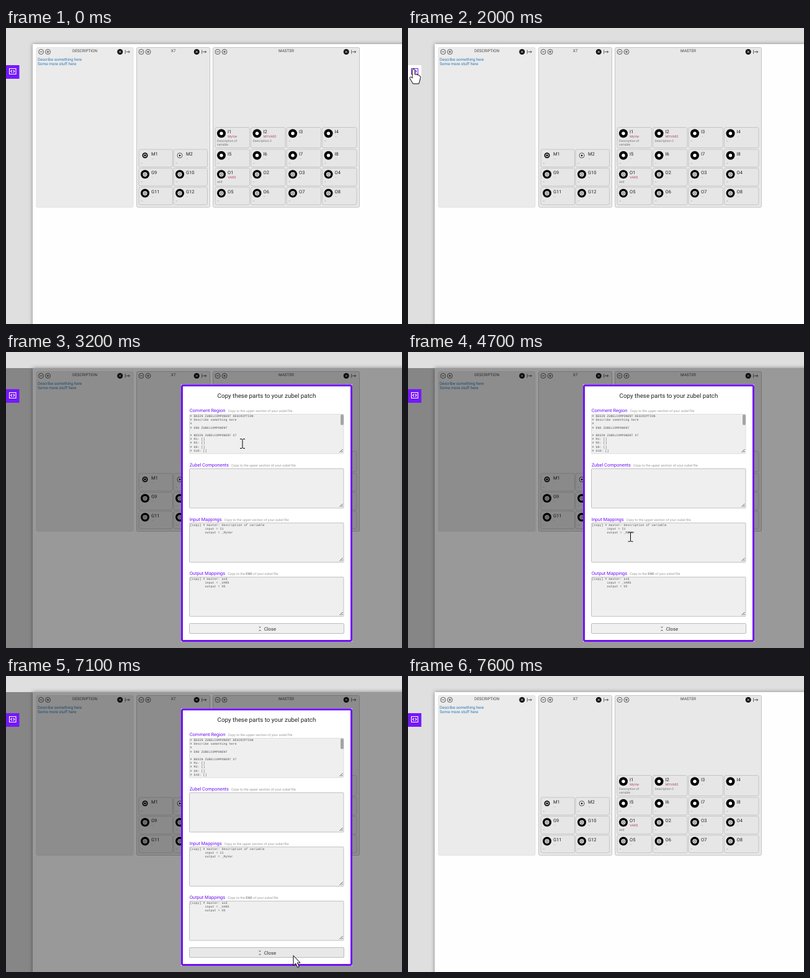
These frames come from a looping animation (638 px wide and 478 px high, 8.7 s). An HTML page:

```html
<!DOCTYPE html>
<html lang="en">
<head>
<meta charset="utf-8">
<title>Patch export dialog</title>
<style>
  html, body { margin: 0; width: 100%; height: 100%; overflow: hidden; }
  svg { display: block; font-family: Roboto, sans-serif; text-rendering: geometricPrecision; }
  .sheet { filter: drop-shadow(0 0 3px #0006); }
  .line { fill: none; stroke: #333; stroke-width: .8; }
  .code { font: 5px "Liberation Mono", monospace; fill: #555; }
  .mark { display: none; fill: #2f86e6; }
  .selected .mark { display: inline; }
  .selected .code { fill: #fff; }
  .menu rect { fill: #7418fa; }
  .menu path { fill: none; stroke: #fff; stroke-width: 1.1; }
  .menu.hover rect { fill: #fff; }
  .menu.hover path { stroke: #7418fa; }
  .close { fill: #f0f0f0; stroke: #bbb; }
  .close.hover { fill: #e8e8e8; }
  .cursor { fill: #fff; stroke: #000; stroke-width: 1; stroke-linejoin: round; }
</style>
</head>
<body>
<svg id="stage" width="638" height="478" viewBox="0 0 638 478"></svg>
<script>
const PURPLE = '#7010f8';
const ROWS = [160, 195.5, 226, 256.5];

const text = (x, y, size, fill, str, extra = '') =>
  `<text x="${x}" y="${y}" font-size="${size}" fill="${fill}" ${extra}>${str}</text>`;
const box = (x, y, w, h, fill, stroke, r = 2, extra = '') =>
  `<rect x="${x}" y="${y}" width="${w}" height="${h}" rx="${r}" fill="${fill}" stroke="${stroke}" ${extra}/>`;
const disc = (x, y, r, fill, stroke = 'none', width = 1) =>
  `<circle cx="${x}" cy="${y}" r="${r}" fill="${fill}" stroke="${stroke}" stroke-width="${width}"/>`;
const line = (d, extra = '') => `<path class="line" d="${d}" ${extra}/>`;

function panel(x, w, title, fill, border) {
  const left = x + 7.5, right = x + w - 21.3, y = 38.5;
  return box(x, 31.5, w, 258, fill, border) +
    text(x + w / 2, 39.3, 6.4, '#444', title, 'text-anchor="middle"') +
    disc(left, y, 4, 'none', '#333', .8) + disc(left + 11, y, 4, 'none', '#333', .8) +
    line(`M${left - 2} ${y}h4m7 0h4m-2-2v4`) +
    disc(right, y, 4.5, '#111') +
    line(`M${right - 1.7} ${y - 1.7}l3.4 3.4m0-3.4l-3.4 3.4`, 'style="stroke:#fff"') +
    line(`M${right + 8.5} ${y - 3}v6m1.5-3h5.5m-2-2l2 2-2 2`);
}

function jack(x, y, name) {
  if (name === 'M1') return disc(x, y, 3.6, '#fff', '#000', 1.8) + disc(x, y, 1.7, '#000');
  if (name === 'M2') return disc(x, y, 4, '#fff', '#333', .9) + disc(x, y, 1.6, '#222');
  const core = name[0] === 'I' ? disc(x, y, 2.7, '#fff')
    : disc(x, y, 3, '#777', '#e8e8e8', 1.3) + disc(x, y, 1.2, '#ddd');
  return disc(x, y, 7, '#000') + core;
}

function card(x, y, w, h, name, variable, notes = ['–']) {
  return box(x, y + .5, w, h, '#e6e6e6', '#c2c2c2', 2.5, 'stroke-width=".9"') +
    jack(x + 10, y + 10.3, name) +
    text(x + 20, y + 10.4, 7.5, '#222', name) +
    text(x + 20.3, y + 17.4, 5.3, variable ? '#b0485e' : '#999', variable || '–') +
    notes.map((s, i) => text(x + 3, y + 24 + i * 6, 5.2, '#777', s)).join('');
}

function cards() {
  const vars = { I1: 'MyVar', I2: 'MYVAR2', O1: 'VAR5' };
  const notes = { I1: ['Description of', 'variable'], I2: ['Description 2'], O1: ['asd'] };
  let out = '';
  for (let i = 0; i < 16; i++) {
    const row = i >> 2, name = (i < 8 ? 'I' : 'O') + (i % 8 + 1);
    out += card(337 + i % 4 * 57.5, ROWS[row], 55.5, row ? 28.5 : 33, name, vars[name], notes[name]);
  }
  ['M1', 'M2', 'G9', 'G10', 'G11', 'G12'].forEach((name, i) => {
    out += card(214 + i % 2 * 56, ROWS[1 + (i >> 1)], 54.5, 28.5, name);
  });
  return out;
}

function section(y, title, hint, lines) {
  const code = lines.map((s, i) => {
    const top = y + .6 + i * 6.2;
    return `<rect class="mark" x="296.5" y="${top}" width="${s.length * 3 + 3}" height="6.2"/>` +
      `<text class="code" x="296.5" y="${top + 4.4}">${s.replace(/ /g, '\xa0')}</text>`;
  }).join('');
  return `<text x="295.7" y="${y - 2.7}" font-size="7.5" fill="${PURPLE}">${title}` +
    `<tspan dx="4" font-size="5.5" fill="#999">Copy to the ${hint} of your zubel file</tspan></text>` +
    box(295.5, y + .5, 248.5, 63.5, '#efefef', lines.length > 3 ? '#dcdcdc' : '#c0c0c0', 1) +
    `<g class="area">${code}</g>` +
    line(`M537.5 ${y + 62}l5-5m-2 5l2-2`);
}

const UPPER = 'upper section';
const dialog =
  box(283.5, 54, 273, 412.5, '#fff', PURPLE, 2, 'stroke-width="3"') +
  text(420, 74, 9.8, '#222', 'Copy these parts to your zubel patch', 'text-anchor="middle"') +
  section(100, 'Comment Region', UPPER, [
    '# BEGIN ZUBELCOMPONENT DESCRIPTION', '# Describe something here', '#',
    '# END ZUBELCOMPONENT', '', '# BEGIN ZUBELCOMPONENT X7',
    '# M1: []', '# M2: []', '# G9: []', '# G10: []']) +
  box(539, 101, 5, 17, '#a4a4a4', 'none') +
  section(188, 'Zubel Components', UPPER, []) +
  section(275.5, 'Input Mappings', UPPER, [
    '[copy] # master: Description of variable', '        input = I1', '        output = _MyVar']) +
  section(363, 'Output Mappings', '<tspan font-weight="bold">END</tspan>', [
    '[copy] # master: asd', '        input = _VAR5', '        output = O5']) +
  '<rect class="close" x="295.5" y="438.5" width="249" height="16" rx="1.5"/>' +
  line('M407.5 443.5l1.5 1.7 1.5-1.7m-3 7l1.5-1.7 1.5 1.7') +
  text(415.7, 450, 7.7, '#333', 'Close');

const stage = document.getElementById('stage');
// The shade leaves the dialog's own area undimmed.
stage.innerHTML =
  '<rect width="638" height="478" fill="#dfdfdf"/>' +
  '<rect class="sheet" x="43" y="26" width="620" height="480" fill="#fefefe"/>' +
  panel(49, 156, 'DESCRIPTION', '#ebebeb', '#e2e2e2') +
  text(51, 53.2, 6.45, '#2f78b4', 'Describe something here') +
  text(51, 60.2, 6.45, '#2f78b4', 'Some more stuff here') +
  panel(210.5, 118, 'X7', '#e8e8e8', '#c4c4c4') +
  panel(333.5, 236, 'MASTER', '#e8e8e8', '#c4c4c4') + cards() +
  '<path id="shade" fill="#0006" fill-rule="evenodd" d="M0 26H638V478H0zM282 52.5V468H558V52.5z"/>' +
  `<g id="dialog">${dialog}</g>` +
  '<g class="menu"><rect y="60" width="21.5" height="22"/>' +
  '<path d="M5.5 65.5h10.5v9h-10.5zM9.7 68l-2 2 2 2m2-4l2 2-2 2"/></g>' +
  '<path class="cursor"/>';

const $ = s => stage.querySelector(s);
const shade = $('#shade'), modal = $('#dialog');
const menu = $('.menu'), closeButton = $('.close'), cursor = $('.cursor');
const areas = stage.querySelectorAll('.area');

const SHAPES = {
  arrow: 'M0 0V16l3.7-3.4 3 6.4 2.6-1.2-3-6.2H11z',
  hand: 'M-2 1.5Q0-1.5 2 1.5V9Q4.5 7.5 5.5 9.8Q8 8.5 8.8 11Q11.5 10.5 11 15L8.5 24H-1L-6.5 14.5Q-5.5 11.5-2 15z',
  beam: 'M-4-7.5h3l1 1 1-1h3M0-6.5v13M-4 7.5h3l1-1 1 1h3'
};
// [time, x, y]
const PATH = [
  [200, 635, 57], [300, 593, 85], [500, 480, 140], [800, 300, 173], [1000, 186, 163],
  [1300, 80, 110], [1700, 9, 66], [2400, 9, 66], [2600, 90, 95], [2900, 345, 172],
  [3000, 383, 165], [3100, 381, 148], [3800, 381, 148], [4100, 362, 215], [4400, 362, 215],
  [4700, 358.5, 298.5], [5200, 358.5, 298.5], [5600, 387.5, 399], [6100, 387.5, 399],
  [6200, 387.5, 416], [6500, 440, 455], [6600, 487, 456], [6700, 503, 437],
  [6800, 475, 454], [6900, 463, 451.5], [7600, 463, 451.5]
];
const FADE = [[2200, 0], [2300, .35], [2400, .83], [2500, 1], [7200, 1], [7300, .56], [7400, .22], [7500, .06], [7600, 0]];
// [text area, from, to]
const SELECTIONS = [[0, 3500, 4300], [2, 5200, 5900], [3, 5900, 7100]];

function track(keys, t, col) {
  const i = keys.findIndex(k => k[0] >= t);
  if (i < 0) return keys[keys.length - 1][col];
  if (!i) return keys[0][col];
  const a = keys[i - 1], b = keys[i];
  return a[col] + (b[col] - a[col]) * (t - a[0]) / (b[0] - a[0]);
}

function draw(now) {
  const t = Math.floor(now % 8700 / 100) * 100;
  const within = (from, to) => t >= from && t < to;

  const alpha = track(FADE, t, 1);
  shade.setAttribute('opacity', alpha);
  modal.setAttribute('opacity', alpha);

  menu.classList.toggle('hover', within(1600, 2500));
  closeButton.classList.toggle('hover', within(6500, 7300));
  areas.forEach((area, i) => area.classList.toggle('selected',
    SELECTIONS.some(([n, from, to]) => n === i && within(from, to))));

  const kind = within(1600, 2500) ? 'hand' : within(3100, 6300) ? 'beam' : 'arrow';
  cursor.setAttribute('d', SHAPES[kind]);
  cursor.setAttribute('fill-opacity', kind === 'beam' ? 0 : 1);
  cursor.setAttribute('transform', `translate(${track(PATH, t, 1)} ${track(PATH, t, 2)})`);
  cursor.setAttribute('opacity', within(200, 7600) ? 1 : 0);
}

let start;
function tick(now) {
  start ??= now;
  draw(now - start);
  requestAnimationFrame(tick);
}
requestAnimationFrame(tick);
</script>
</body>
</html>
```
